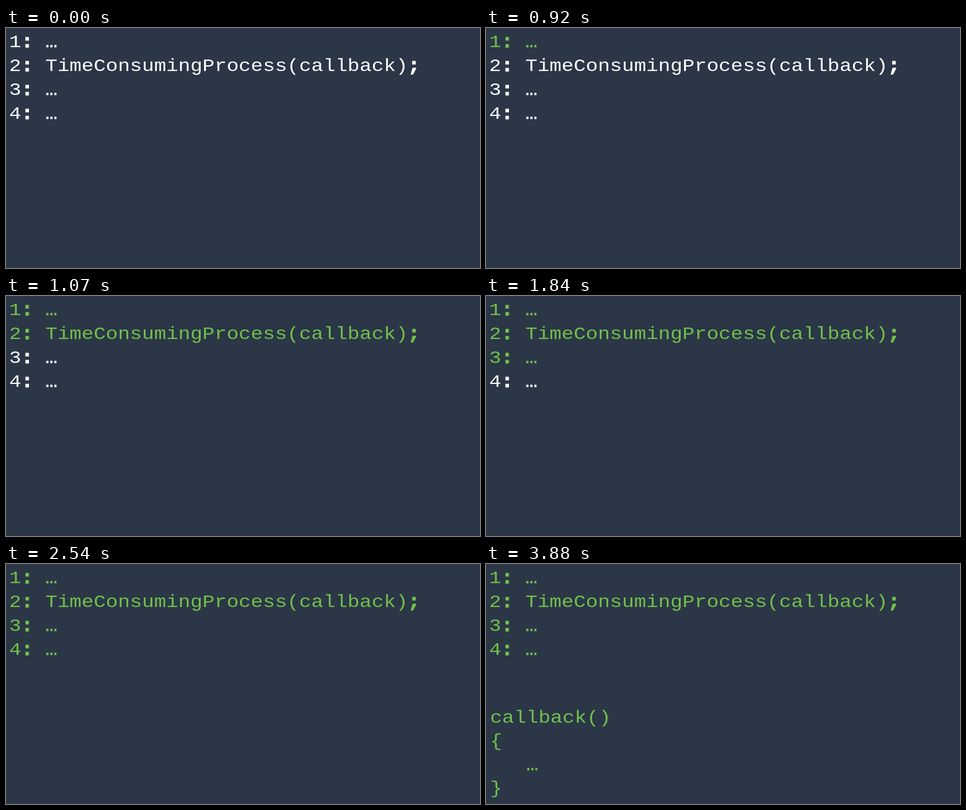
Recreate the animation shown at these times as an HTML page. Size 988x502 px, loop 4.42 s.

```html
<!DOCTYPE html>
<html lang="en">
<head>
<meta charset="utf-8">
<title>Asynchronous callback</title>
<style>
  html, body { margin: 0; width: 100%; height: 100%; overflow: hidden; background: #2b3747; }
  svg { display: block; width: 988px; height: 502px; }
  text { font: 42px "Liberation Mono", "Courier New", monospace; white-space: pre; fill: #fff; }
  .on { fill: #72bf4b; }
  .colon, .dots { stroke: #fff; stroke-linejoin: round; }
  .on .colon, .on .dots { stroke: #72bf4b; }
  .colon { stroke-width: 2.6px; }
  .dots { stroke-width: 1px; }
</style>
</head>
<body>
<svg viewBox="0 0 988 502"></svg>
<script>
const LOOP = 4420;
const CALL = 3320;

// text, left, baseline, time it turns green, time it appears
const lines = [
  ["1: …", 6.4, 40, 230, 0],
  ["2: TimeConsumingProcess(callback);", 6.4, 90, 1070, 0],
  ["3: …", 6.4, 140, 1840, 0],
  ["4: …", 6.4, 190, 2540, 0],
  ["callback()", 8.4, 332, CALL, CALL],
  ["{", 8.4, 381, CALL, CALL],
  ["   …", 8.4, 431, CALL, CALL],
  ["}", 8.4, 480, CALL, CALL]
];

const svg = document.querySelector("svg");
const rows = lines.map(([text, x, y, green, shown]) => {
  const el = document.createElementNS(svg.namespaceURI, "text");
  el.setAttribute("transform", `translate(${x} ${y}) scale(1 .9)`);
  el.innerHTML = text
    .replace(/[:;]/g, '<tspan class="colon">$&</tspan>')
    .replace("…", '<tspan class="dots">…</tspan>');
  svg.append(el);
  return { el, green, shown };
});

const start = performance.now();

function draw() {
  const t = (performance.now() - start) % LOOP;
  for (const { el, green, shown } of rows) {
    el.classList.toggle("on", t >= green);
    el.style.visibility = t >= shown ? "visible" : "hidden";
  }
  requestAnimationFrame(draw);
}
draw();
</script>
</body>
</html>
```
